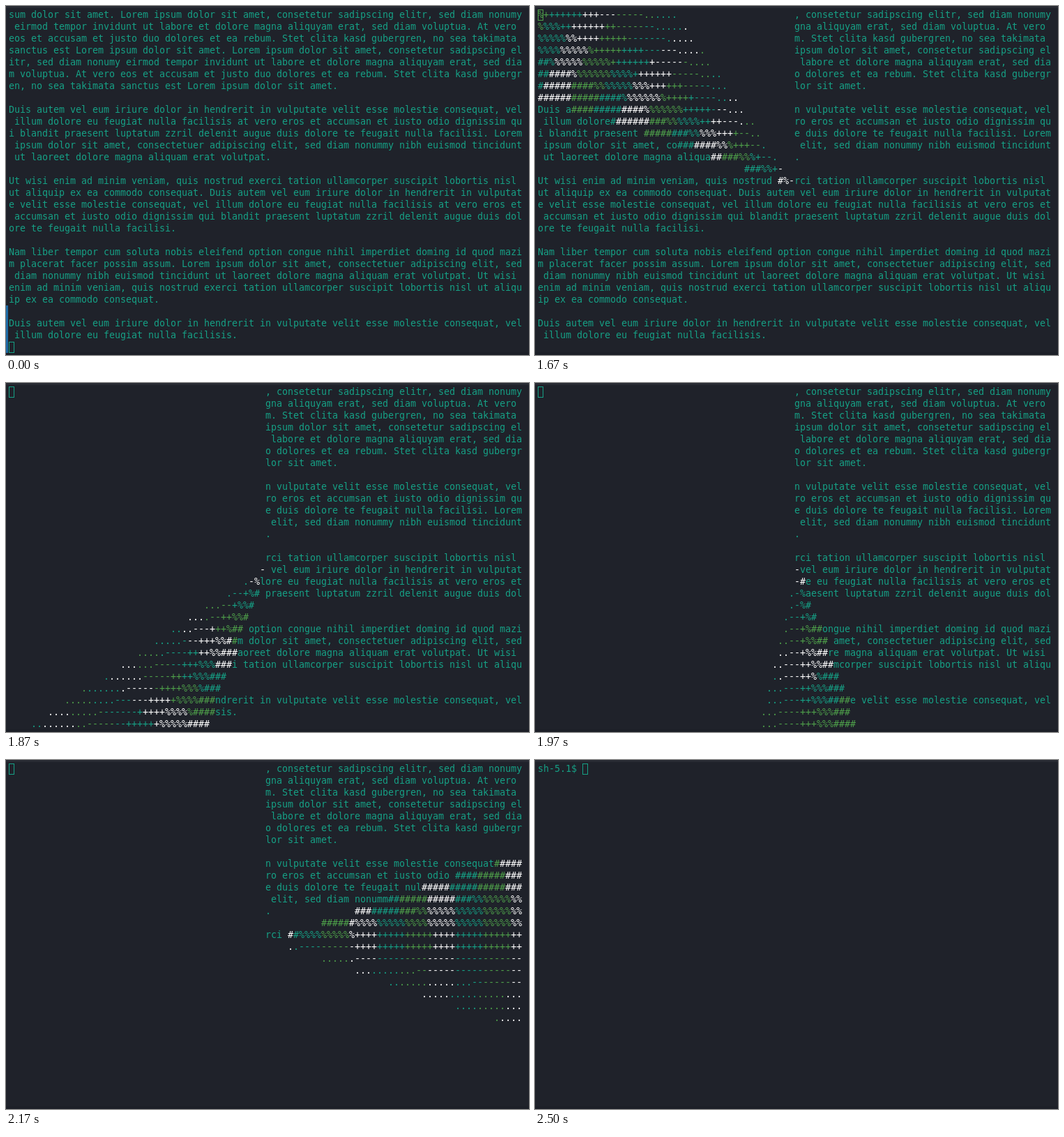
An HTML page with a canvas for the animation above (3210 ms loop, 750 px wide and 500 px high).

```html
<!DOCTYPE html>
<html lang="en">
<head>
<meta charset="utf-8">
<title>Terminal wipe</title>
<style>
html, body { margin: 0; height: 100%; overflow: hidden; background: #1f222a; }
canvas { display: block; }
</style>
</head>
<body>
<canvas id="stage" width="750" height="500"></canvas>
<script>
const ctx = document.getElementById('stage').getContext('2d');
const COLS = 92, ROWS = 29, CELL_W = 8, CELL_H = 17, LEFT = 4, TOP = 5;
const LOOP = 3210, WIPE_START = 1500, WIPE_FRAMES = 30;
const TEAL = '#16a085', STRIPES = ['#ffffff', TEAL, '#4e9f4a'], STRIPE_WIDTH = 4.845;
const TRAIL = '#%+-.', BAND = 0.02, STEP = 0.04;

const paragraphs = [
  'sum dolor sit amet. Lorem ipsum dolor sit amet, consetetur sadipscing elitr, sed diam nonumy eirmod tempor invidunt ut labore et dolore magna aliquyam erat, sed diam voluptua. At vero eos et accusam et justo duo dolores et ea rebum. Stet clita kasd gubergren, no sea takimata sanctus est Lorem ipsum dolor sit amet. Lorem ipsum dolor sit amet, consetetur sadipscing elitr, sed diam nonumy eirmod tempor invidunt ut labore et dolore magna aliquyam erat, sed diam voluptua. At vero eos et accusam et justo duo dolores et ea rebum. Stet clita kasd gubergren, no sea takimata sanctus est Lorem ipsum dolor sit amet.',
  'Duis autem vel eum iriure dolor in hendrerit in vulputate velit esse molestie consequat, vel illum dolore eu feugiat nulla facilisis at vero eros et accumsan et iusto odio dignissim qui blandit praesent luptatum zzril delenit augue duis dolore te feugait nulla facilisi. Lorem ipsum dolor sit amet, consectetuer adipiscing elit, sed diam nonummy nibh euismod tincidunt ut laoreet dolore magna aliquam erat volutpat.',
  'Ut wisi enim ad minim veniam, quis nostrud exerci tation ullamcorper suscipit lobortis nisl ut aliquip ex ea commodo consequat. Duis autem vel eum iriure dolor in hendrerit in vulputate velit esse molestie consequat, vel illum dolore eu feugiat nulla facilisis at vero eros et accumsan et iusto odio dignissim qui blandit praesent luptatum zzril delenit augue duis dolore te feugait nulla facilisi.',
  'Nam liber tempor cum soluta nobis eleifend option congue nihil imperdiet doming id quod mazim placerat facer possim assum. Lorem ipsum dolor sit amet, consectetuer adipiscing elit, sed diam nonummy nibh euismod tincidunt ut laoreet dolore magna aliquam erat volutpat. Ut wisi enim ad minim veniam, quis nostrud exerci tation ullamcorper suscipit lobortis nisl ut aliquip ex ea commodo consequat.',
  'Duis autem vel eum iriure dolor in hendrerit in vulputate velit esse molestie consequat, vel illum dolore eu feugiat nulla facilisis.'
];

// Hard wrap at the terminal width, with an empty line after each paragraph.
const lines = paragraphs.flatMap(p => [...p.match(/.{1,92}/g), '']);

function fill(color, x, y, w, h) {
  ctx.fillStyle = color;
  ctx.fillRect(x, y, w, h);
}

function put(char, col, row, color) {
  if (char === ' ') return;
  ctx.fillStyle = color;
  ctx.fillText(char, LEFT + col * CELL_W, TOP + 12 + row * CELL_H);
}

function cursor(col, row, color) {
  ctx.strokeStyle = color;
  ctx.strokeRect(LEFT + col * CELL_W + 0.5, TOP + row * CELL_H + 0.5, CELL_W - 1, 15);
}

// Character and colour of a cell while the wipe's leading edge is at `lead` turns.
function cellAt(col, row, lead) {
  const dx = col - COLS / 2, dy = 2 * (row - ROWS / 2);
  const turn = 0.5 + Math.atan2(dx, dy) / (2 * Math.PI);
  const text = lines[row][col] || ' ';
  if (turn >= lead) return [text, TEAL];
  const band = Math.floor((lead - turn) / BAND + 1e-6);
  if (band >= TRAIL.length) return [' ', TEAL];
  return [TRAIL[band], STRIPES[Math.floor(Math.hypot(dx, dy) / STRIPE_WIDTH) % 3]];
}

function draw(ms) {
  // 30 frames per second, with frame times rounded to 10 ms
  const frame = Math.floor((Math.floor(ms / 10) - WIPE_START / 10 + 0.34) * 0.3);
  fill('#1f222a', 0, 0, 750, 500);
  fill('#282b33', 0, 0, 750, 3);
  fill('#1c1f27', 0, 496, 750, 4);
  ctx.font = '13.333px "DejaVu Sans Mono", monospace';
  ctx.lineWidth = 1;

  if (frame >= WIPE_FRAMES) {
    [...'sh-5.1$'].forEach((char, i) => put(char, i, 0, TEAL));
    cursor(8, 0, TEAL);
    return;
  }
  const lead = Math.max(0, frame) * STEP;
  for (let row = 0; row < ROWS; row++) {
    for (let col = 0; col < COLS; col++) {
      const [char, color] = cellAt(col, row, lead);
      put(char, col, row, color);
    }
  }
  if (frame < 0) {
    fill('#1d6aa5', 0, 429, 3, 68);
    cursor(0, ROWS - 1, TEAL);
  } else {
    cursor(0, 0, cellAt(0, 0, lead)[1]);
  }
}

const start = performance.now();
function tick() {
  draw((performance.now() - start) % LOOP);
  requestAnimationFrame(tick);
}
tick();
</script>
</body>
</html>
```
